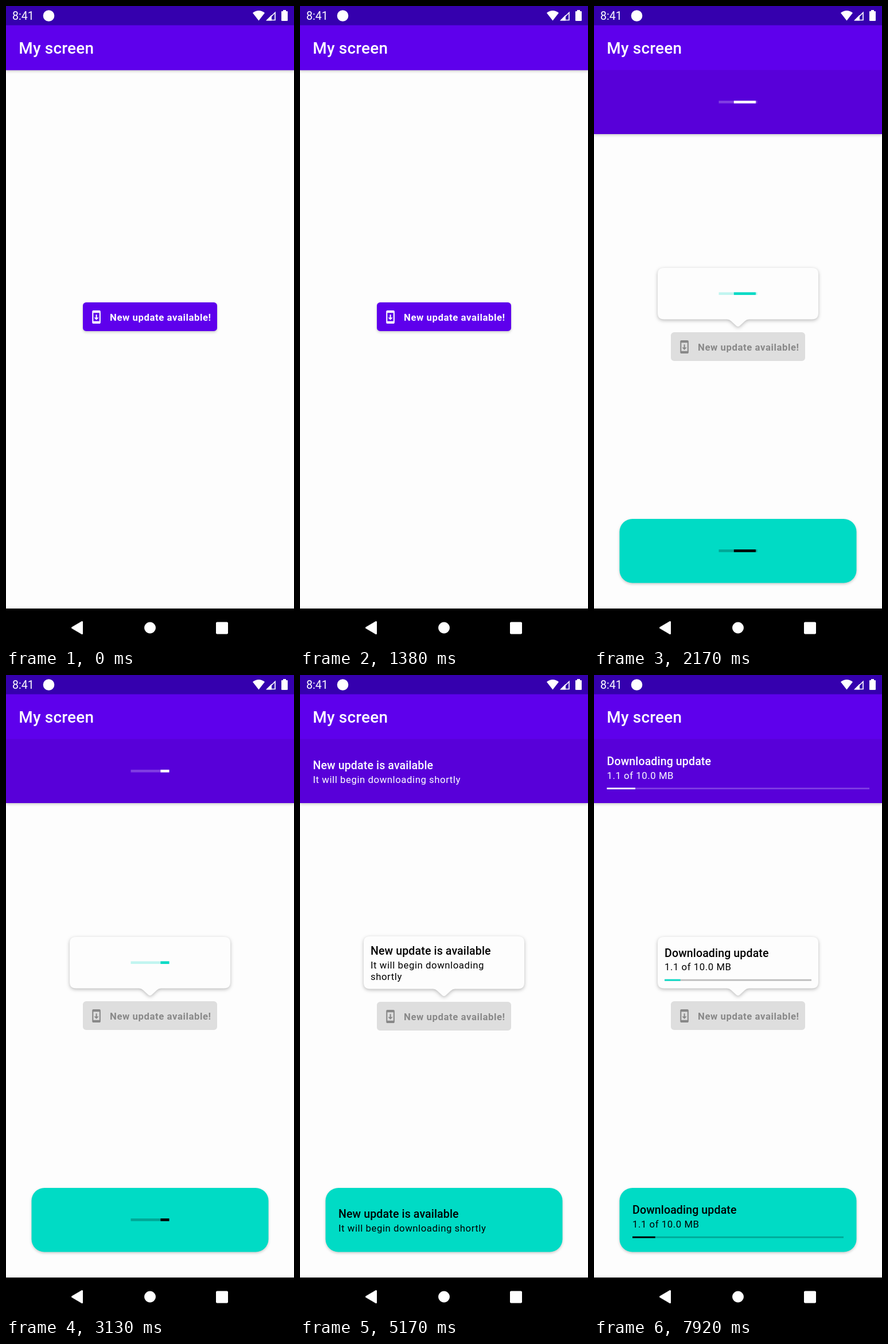
These frames come from a looping animation (502x1116 px, 8 s). An HTML page:

```html
<!DOCTYPE html>
<html lang="en">
<head>
<meta charset="utf-8">
<title>My screen</title>
<style>
  html, body { margin: 0; width: 100%; height: 100%; overflow: hidden; background: #fdfdfd; }
  svg { display: block; }
  text { font-family: Roboto, sans-serif; white-space: pre; }
  .bar-title { font-size: 27.9px; font-weight: 500; letter-spacing: .21px; }
  .clock { font-size: 19.5px; }
  .title { font-size: 19.53px; font-weight: 500; letter-spacing: .14px; }
  .note { font-size: 16.74px; letter-spacing: .56px; }
  .label { font-size: 16.74px; font-weight: 700; letter-spacing: .56px; }
  .raised { filter: drop-shadow(0 2px 2px rgba(0, 0, 0, .2)); }
  .bubble { filter: drop-shadow(0 2px 3px rgba(0, 0, 0, .27)); }
</style>
</head>
<body>
<svg id="stage" width="502" height="1116" viewBox="0 0 502 1116">
  <rect width="502" height="1116" fill="#fdfdfd"/>

  <g class="raised">
    <rect id="bannerFill" y="111" width="502" fill="#5800d9"/>
    <rect y="33" width="502" height="78.5" fill="#5e00ec"/>
  </g>
  <svg id="bannerClip" width="502" height="0"><g id="banner"></g></svg>
  <text class="bar-title" x="22.3" y="83" fill="#fff">My screen</text>

  <rect width="502" height="33.5" fill="#3500ae"/>
  <g fill="#fff">
    <text class="clock" x="11" y="24">8:41</text>
    <circle cx="74.5" cy="17" r="9.8"/>
    <path d="M430 12Q440.5 4 451 12L440.5 25.5Z"/>
    <path d="M453 25.5L463 15.5V25.5Z"/>
    <path d="M456 24.5L469 11.500V24.500Z" fill="none" stroke="#fff" stroke-width="1.7"/>
    <path d="M483 7h5v2h2q1 0 1 1v15q0 1-1 1h-9q-1 0-1-1V10q0-1 1-1h2z"/>
  </g>

  <g id="button">
    <rect id="buttonFill" x="134" width="234" height="50" rx="5.6"/>
    <path transform="translate(145 13) scale(1.046)" d="M17 1H7C5.900 1 5 1.900 5 3v18c0 1.100.9 2 2 2h10c1.100 0 2-.9 2-2V3c0-1.100-.9-2-2-2zM17 19H7V5h10zM16 13h-3V8h-2v5H8l4 4z" fill-rule="evenodd"/>
    <text class="label" x="181" y="32">New update available!</text>
  </g>

  <g id="bubbleFade"><g id="bubble">
    <path id="bubbleShape" class="bubble" fill="#fdfdfd"/>
    <g id="bubbleBody"></g>
  </g></g>

  <g id="card">
    <rect class="raised" x="44.5" y="893" width="413" height="111.500" rx="22.300" fill="#00dbc5"/>
    <g id="cardBody"></g>
  </g>

  <rect y="1049" width="502" height="67"/>
  <g fill="#fff" stroke="#fff" stroke-linejoin="round">
    <path d="M115.500 1082.500L132.500 1072.500V1092.500Z" stroke-width="3"/>
    <circle cx="251" cy="1082.500" r="9.500"/>
    <rect x="367" y="1073.500" width="19" height="19" rx="1" stroke-width="2"/>
  </g>
</svg>
<script>
const LOOP = 8000, SHOWN = 1405, SPINNING = 1420, AVAILABLE = 3400, DOWNLOADING = 5350;
const FIRST_TICK = 5840, TICK = 500, TICK_MB = 0.27, TOTAL_MB = 10;
const BAR_X = 217.5, BAR_W = 67;

const el = id => document.getElementById(id);
const set = (node, attrs) => { for (const k in attrs) node.setAttribute(k, attrs[k]); };

function makePanel(host, { x, width, ink, bar, idleTrack, track, lines, titleY }) {
  const notes = lines.map((s, i) =>
    `<text class="note" x="${x}" y="${titleY + 23.7 + i * 19.6}">${s}</text>`).join('');
  host.innerHTML = `
    <g fill="${bar}">
      <rect x="${BAR_X}" y="-2.3" width="${BAR_W}" height="4.6" fill="${idleTrack}"/>
      <rect class="runner" y="-2.3" height="4.6"/><rect class="runner" y="-2.3" height="4.6"/>
    </g>
    <g fill="${ink}"><text class="title" x="${x}" y="${titleY}">New update is available</text>${notes}</g>
    <g fill="${ink}">
      <text class="title" x="${x}" y="-10.2">Downloading update</text>
      <text class="note count" x="${x}" y="13.5"></text>
      <rect x="${x}" y="29" width="${width}" height="2.8" fill="${track}"/>
      <rect class="done" x="${x}" y="29" height="2.8" fill="${bar}"/>
    </g>`;
  return {
    states: [...host.children], runners: host.querySelectorAll('.runner'),
    count: host.querySelector('.count'), done: host.querySelector('.done'), width
  };
}

const oneLine = ['It will begin downloading shortly'];
const panels = [
  makePanel(el('banner'), { x: 22.5, width: 457.5, ink: '#fff', bar: '#fff',
    idleTrack: '#ffffff3d', track: '#ffffff3d', lines: oneLine, titleY: -3.3 }),
  makePanel(el('bubbleBody'), { x: 123, width: 256, ink: '#000', bar: '#03dac5',
    idleTrack: '#03dac53d', track: '#00000042', lines: ['It will begin downloading', 'shortly'], titleY: -13.4 }),
  makePanel(el('cardBody'), { x: 67, width: 368, ink: '#000', bar: '#000',
    idleTrack: '#0000003d', track: '#0000003d', lines: oneLine, titleY: -3.3 })
];
set(el('banner'), { transform: 'translate(0 55.7)' });
set(el('cardBody'), { transform: 'translate(0 948.5)' });

// Critically damped spring, stiffness 400
const spring = ms => ms <= 0 ? 0 : 1 - (1 + ms / 50) * Math.exp(-ms / 50);

function bezier(x1, y1, x2, y2, x) {
  const at = (a, b, s) => 3 * a * s * (1 - s) ** 2 + 3 * b * s * s * (1 - s) + s ** 3;
  let lo = 0, hi = 1;
  for (let i = 0; i < 24; i++) {
    const mid = (lo + hi) / 2;
    if (at(x1, x2, mid) < x) lo = mid; else hi = mid;
  }
  return at(y1, y2, (lo + hi) / 2);
}

// Head and tail of the two segments of the indeterminate bar
function segments(ms) {
  const part = (delay, span, ...curve) =>
    bezier(...curve, Math.min(1, Math.max(0, (ms - delay) / span)));
  return [
    [part(333, 850, .2, 0, .8, 1), part(0, 750, .2, 0, .8, 1)],
    [part(1267, 533, .1, 0, .45, 1), part(1000, 567, 0, 0, .65, 1)]
  ];
}

function bubblePath(h) {
  const r = 11;
  return `M122 0H380q${r} 0 ${r} ${r}V${h - r}q0 ${r} ${-r} ${r}H270
    q-4 0 -7 3L254 ${h + 11.3}q-3 2.500 -6 0L239 ${h + 3}q-3 -3 -7 -3H122
    q${-r} 0 ${-r} ${-r}V${r}q0 ${-r} ${r} ${-r}Z`;
}

function draw(t) {
  const shown = t >= SHOWN, p = spring(t - SHOWN);
  const state = t < AVAILABLE ? 0 : t < DOWNLOADING ? 1 : 2;
  const slot = state === 1 ? 106 : 104, bubbleH = slot - 14.5;

  set(el('bannerFill'), { height: .5 + 111.5 * p });
  set(el('bannerClip'), { y: 111.5, height: 111.5 * p, opacity: p });

  set(el('button'), { transform: `translate(0 ${516 + slot * p / 2})`, fill: shown ? '#888' : '#fff' });
  set(el('buttonFill'), { fill: shown ? '#dedede' : '#5e00ec', class: shown ? '' : 'raised' });

  set(el('bubbleFade'), { opacity: p });
  set(el('bubble'), { transform: `translate(0 ${508 - slot * p / 2})` });
  set(el('bubbleShape'), { d: bubblePath(bubbleH) });
  set(el('bubbleBody'), { transform: `translate(0 ${bubbleH / 2})` });
  set(el('card'), { opacity: p });

  const runs = segments(Math.max(0, t - SPINNING) * .912 % 1800);
  const mb = TICK_MB * Math.max(0, Math.floor((t - FIRST_TICK) / TICK));
  for (const panel of panels) {
    panel.states.forEach((g, i) => set(g, { display: i === state ? 'inline' : 'none' }));
    panel.runners.forEach((r, i) => {
      const [tail, head] = runs[i];
      set(r, { x: BAR_X + BAR_W * tail, width: BAR_W * Math.max(0, head - tail) });
    });
    panel.count.textContent = `${mb.toFixed(1)} of ${TOTAL_MB.toFixed(1)} MB`;
    set(panel.done, { width: panel.width * mb / TOTAL_MB });
  }
}

const start = performance.now();
function frame() {
  draw((performance.now() - start) % LOOP);
  requestAnimationFrame(frame);
}
frame();
</script>
</body>
</html>
```
